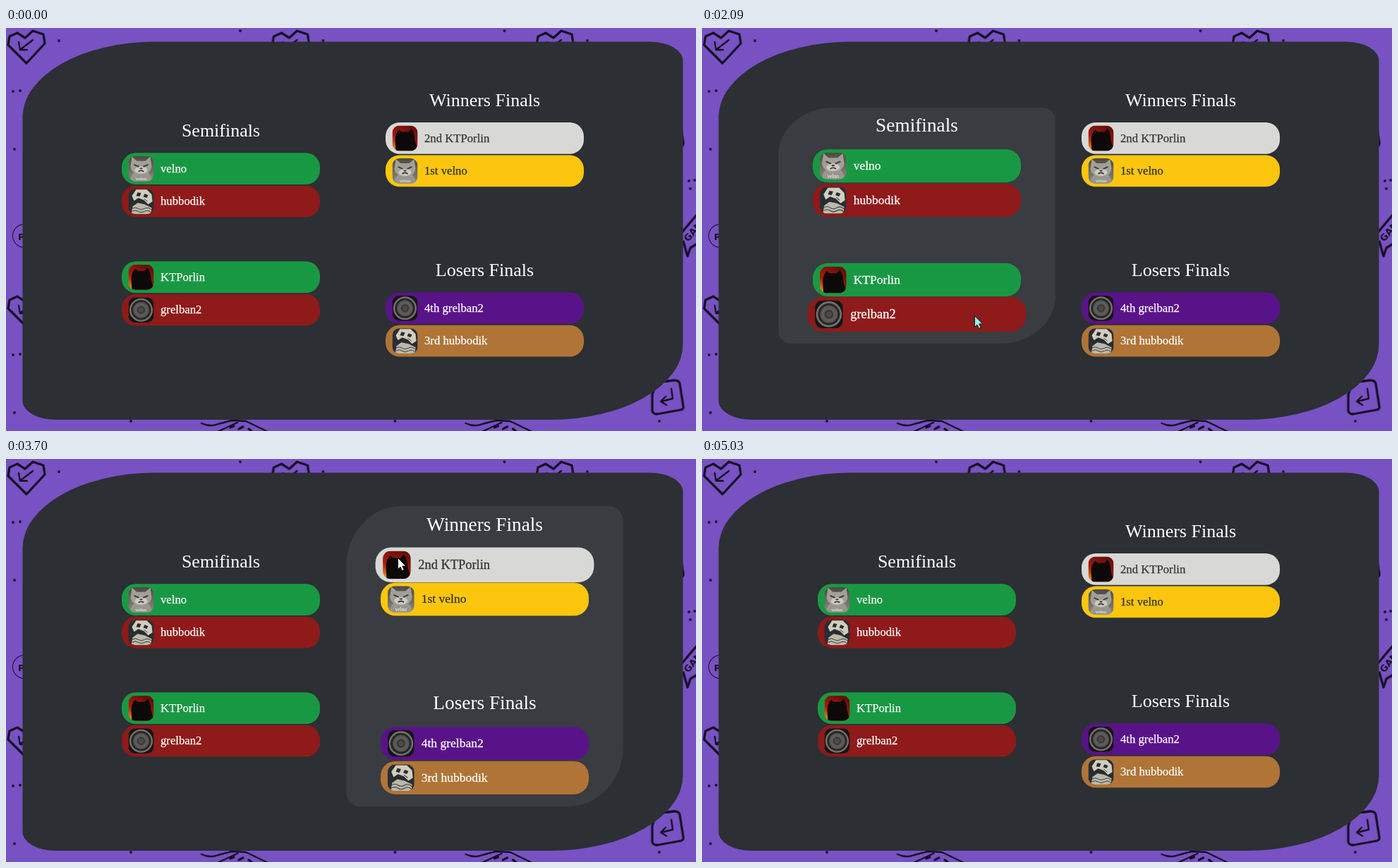
An HTML page for the animation above (5.77 s loop, 978x572 px).

```html
<!DOCTYPE html>
<html lang="en">
<head>
<meta charset="utf-8">
<title>Bracket</title>
<style>
  html, body { margin: 0; width: 100%; height: 100%; overflow: hidden; background: #7851c3; }
  svg { display: block; }
  text { font-family: "Liberation Serif", "Times New Roman", serif; }
  .title { font-size: 26px; fill: #fff; text-anchor: middle; }
  .name { font-size: 16.7px; stroke-width: .25px; }
  .doodle { fill: none; stroke: #140e22; stroke-width: 3.3; stroke-linecap: round; stroke-linejoin: round; }
  .doodle .thin { stroke-width: 2.4; }
  .hand { font: bold 13px "DejaVu Sans", sans-serif; fill: #140e22; stroke: none; }
</style>
</head>
<body>
<svg width="978" height="572" viewBox="0 0 978 572">
  <defs>
    <clipPath id="round"><rect width="36" height="36" rx="10"/></clipPath>
    <linearGradient id="fire" x1="0" y1="1" x2=".6" y2="0"><stop stop-color="#f2a11c"/><stop offset=".45" stop-color="#a81a10"/><stop offset="1" stop-color="#6a0e0b"/></linearGradient>
    <radialGradient id="cone"><stop stop-color="#6d6c69"/><stop offset=".3" stop-color="#454442"/><stop offset=".5" stop-color="#605f5c"/><stop offset="1" stop-color="#393837"/></radialGradient>
    <linearGradient id="fur" x2="0" y2="1"><stop stop-color="#4b4a44"/><stop offset="1" stop-color="#8b8980"/></linearGradient>

    <pattern id="tile" class="doodle" width="374.5" height="374" patternUnits="userSpaceOnUse">
      <path d="M29 50L3 24L5 12L16 7L27 14L38 4L53 9L55 22Z"/>
      <path class="thin" d="M38 17L21 30M18 20L20 31L30 31"/>
      <path class="thin" d="M277 187Q290 193 301 188L320 183L340 184L371 199M300 199L328 186"/>
      <path d="M318 193L323 191M330 195L336 192M344 195L348 198"/>
      <circle cx="26" cy="295" r="16.5" stroke-width="1"/>
      <text class="hand" x="17" y="301">P</text>
      <path d="M209 290L231 264M211 303L217 324L221 312L231 306"/>
      <text class="hand" transform="translate(218 304) rotate(-50)">GAME</text>
      <path d="M167 146L173 129L198 126Q205 126 206 131L211 163Q212 167 207 168L174 174Q166 174 167 166Z"/>
      <path class="thin" d="M194 138L196 152L180 156M186 149L179 156L187 161"/>
      <path stroke-width="3.8" d="M75 18h0M332 4h0M10 90h0M20 89h0M12 172h0M177 184h0M219 217h0M227 216h0M221 228h0"/>
    </pattern>

    <g id="cat">
      <rect width="36" height="36" fill="url(#fur)"/>
      <path d="M3 36Q3 26 9 23H27Q33 26 33 36Z" fill="#98968d"/>
      <path d="M5 1L12 7H24L31 1L33 15Q31 26 18 26Q5 26 3 15Z" fill="#a19f96"/>
      <ellipse cx="18" cy="20" rx="9" ry="5" fill="#cdcbc2"/>
      <path d="M8 12L15 15M28 12L21 15M16 17.500H20M14 22Q18 19 22 22" stroke="#37362f" stroke-width="1.800" fill="none"/>
      <text x="18" y="34" text-anchor="middle" font-size="7" fill="#fff">velno</text>
    </g>
    <g id="shadow">
      <rect width="36" height="36" fill="url(#fire)"/>
      <path d="M5 36L4 20Q5 9 10 6L13 9H23L27 4Q32 12 32 20L36 36Z" fill="#0e0909"/>
    </g>
    <g id="bones">
      <rect width="36" height="36" fill="#272e33"/>
      <path d="M11 1H26L33 8L34 18L28 22L22 16L14 13L8 17L5 10Z" fill="#d2cdbd"/>
      <path d="M6 25L13 20L23 22L33 27L32 36H4Z" fill="#bdb9aa"/>
      <path d="M13 5L18 6L16 11L11 10ZM23 7L28 9L26 13L21 11Z" fill="#272e33"/>
      <path d="M5 28Q10 25 14 28T23 28T33 30M5 32Q10 29 14 32T23 32T33 34M22 14L27 18" stroke="#343b3e" fill="none"/>
    </g>
    <g id="speaker">
      <rect width="36" height="36" fill="#151515"/>
      <circle cx="18" cy="18" r="15.500" fill="url(#cone)" stroke="#777672" stroke-width="2"/>
      <circle cx="18" cy="18" r="12.500" fill="none" stroke="#222" stroke-width="2"/>
      <circle cx="18" cy="18" r="4.500" fill="#4b4a48" stroke="#2a2a29"/>
    </g>
  </defs>
  <rect width="978" height="572" fill="#7851c3"/>
  <rect width="978" height="572" fill="url(#tile)"/>
  <g id="board"></g>
  <g id="pointer"></g>
</svg>
<script>
const NS = "http://www.w3.org/2000/svg";
const LOOP = 5770, STEP = 70, LAG = 50, ZOOM = 1.05;
const ROW_W = 281, ROW_H = 44.8, PITCH = 46.5, PANEL_W = 374;
const GREEN = "#199843", RED = "#8e1a1a";
const tints = { [GREEN]: "#ff9ad0", [RED]: "#8ef4ea" };
const $ = id => document.getElementById(id);

function add(parent, tag, attrs, text) {
  const el = document.createElementNS(NS, tag);
  for (const k in attrs) el.setAttribute(k, attrs[k]);
  if (text) el.textContent = text;
  return parent.appendChild(el);
}

// Leaf-like box: two opposite corners at 20 %, the others at 5 %.
function leaf(x, y, w, h) {
  const a = (r, sx, sy) => `a${w * r} ${h * r} 0 0 1 ${sx * w * r} ${sy * h * r}`;
  return `M${x} ${y + h * .2}${a(.2, 1, -1)}h${w * .75}${a(.05, 1, 1)}v${h * .75}` +
    `${a(.2, -1, 1)}h${-w * .75}${a(.05, -1, -1)}Z`;
}

function zoom(el, cx, cy, on) {
  const s = on ? ZOOM : 1;
  el.setAttribute("transform", `translate(${cx} ${cy}) scale(${s}) translate(${-cx} ${-cy})`);
}

const board = $("board");
add(board, "path", { d: leaf(23.5, 19.5, 936, 536.5), fill: "#2c2f33" });

// Each match: top, title, then two rows of colour, picture, name and ink
const groups = [
  { cx: 304.5, cy: 280.5, h: 319, matches: [
    [177.3, "Semifinals", [GREEN, "cat", "velno"], [RED, "bones", "hubbodik"]],
    [331.3, "", [GREEN, "shadow", "KTPorlin"], [RED, "speaker", "grelban2"]]] },
  { cx: 678.5, cy: 280, h: 406, matches: [
    [134, "Winners Finals", ["#d8d9d7", "shadow", "2nd KTPorlin", "#333"], ["#fcc60e", "cat", "1st velno", "#333"]],
    [375.3, "Losers Finals", ["#591389", "speaker", "4th grelban2"], ["#b07437", "bones", "3rd hubbodik"]]] }
];

function addRow(g, y, [fill, pic, label, ink = "#fff"]) {
  const x = g.cx - ROW_W / 2, el = add(g.el, "g");
  add(el, "rect", { x, y, width: ROW_W, height: ROW_H, rx: 20, fill });
  const spot = add(el, "g", { transform: `translate(${x + 9.5} ${y + 4.5})` });
  add(spot, "use", { href: "#" + pic, "clip-path": "url(#round)" });
  const text = add(el, "text", { class: "name", x: x + 55, y: y + 27.5, fill: ink, stroke: ink }, label);
  return { el, x, y, fill, textX: x + 55, textW: text.getComputedTextLength() };
}

for (const g of groups) {
  g.el = add(board, "g");
  g.panel = add(g.el, "path", { d: leaf(g.cx - PANEL_W / 2, g.cy - g.h / 2, PANEL_W, g.h), fill: "#393c40" });
  g.rows = [];
  for (const [top, title, ...rows] of g.matches) {
    add(g.el, "text", { class: "title", x: g.cx, y: top - 23.5 }, title);
    rows.forEach((row, i) => g.rows.push(addRow(g, top + i * PITCH, row)));
  }
}

const arrow = add($("pointer"), "path", { d: "M.5 .5V16.500L4 13.200L6.500 18.500L9.200 17.300L6.800 12H11.700Z", stroke: "#16181a" });
const beam = add($("pointer"), "g", { fill: "none" });
for (const [stroke, width] of [["#ccc", 2.8], ["#111", 1.6]])
  add(beam, "path", { d: "M-3.500 -8H3.500M0 -8V8M-3.500 8H3.500", stroke, "stroke-width": width });

// Pointer stops: time, x, y
const stops = [
  [860, 643, 556], [1420, 404, 456], [1610, 397, 441], [1680, 393, 436], [2020, 393, 436], [2090, 386, 408],
  [2790, 363, 200], [3490, 555, 140], [3700, 555, 140], [4330, 592, 393], [4960, 633, 561]
];

function pointerAt(t) {
  const i = Math.max(1, stops.findIndex(p => p[0] >= t));
  const [t0, x0, y0] = stops[i - 1], [t1, x1, y1] = stops[i];
  const k = (t - t0) / (t1 - t0);
  return [x0 + (x1 - x0) * k, y0 + (y1 - y0) * k];
}

// Panel and row under a point; rows are tested at their enlarged size.
function hit([px, py]) {
  const group = groups.find(g => Math.abs(px - g.cx) < PANEL_W / 2 && Math.abs(py - g.cy) < g.h / 2);
  if (!group) return {};
  const x = group.cx + (px - group.cx) / ZOOM, y = group.cy + (py - group.cy) / ZOOM;
  const row = group.rows.find(r => x > r.x && x < r.x + ROW_W && y > r.y && y < r.y + ROW_H);
  return { group, row, onText: row && x > row.textX && x < row.textX + row.textW };
}

const show = (el, on) => { el.style.display = on ? "" : "none"; };

function draw(time) {
  const t = Math.floor((time + 10) / STEP) * STEP - 10;
  const shown = t >= stops[0][0] && t <= stops[stops.length - 1][0];
  const pos = shown ? pointerAt(t) : [-99, -99];
  const over = shown ? hit(pointerAt(t - LAG)) : {};

  for (const g of groups) {
    zoom(g.el, g.cx, g.cy, g === over.group);
    show(g.panel, g === over.group);
    for (const r of g.rows) zoom(r.el, g.cx, r.y + ROW_H / 2, r === over.row);
  }

  const { row, onText } = hit(pos);
  $("pointer").setAttribute("transform", `translate(${pos.map(Math.round).join(" ")})`);
  show(arrow, !onText);
  show(beam, onText);
  arrow.setAttribute("fill", row && tints[row.fill] || "#fff");
}

const begin = performance.now();
function tick() {
  draw((performance.now() - begin) % LOOP);
  requestAnimationFrame(tick);
}
tick();
</script>
</body>
</html>
```
